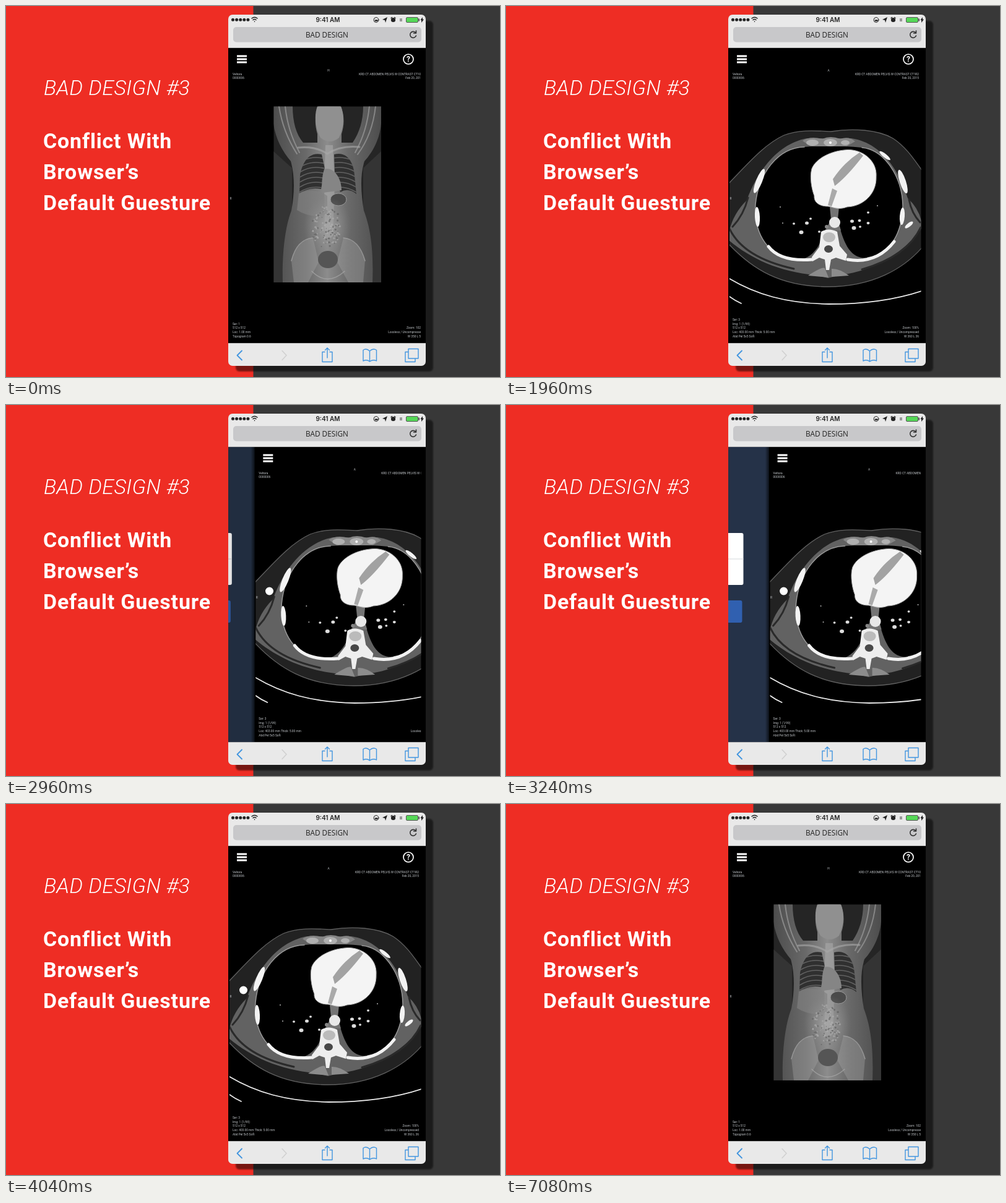
Animation, 798 px wide and 600 px high, one loop 7120 ms. Source, as an HTML page:

```html
<!DOCTYPE html>
<html lang="en">
<head>
<meta charset="utf-8">
<title>Bad design #3</title>
<style>
  html, body { margin: 0; width: 100%; height: 100%; overflow: hidden; background: #383838; }
  svg { display: block; }
  text { font-family: Roboto, "Open Sans", sans-serif; }
  .title { font-size: 34px; fill: #fff; }
  .light { font-weight: 300; font-style: italic; letter-spacing: .4px; }
  .bold { font-weight: 700; letter-spacing: .8px; }
  .tiny text { font-size: 4.8px; fill: #c4c8cc; }
  .line { fill: none; stroke-linecap: round; stroke-linejoin: round; }
</style>
</head>
<body>
<svg width="798" height="600" viewBox="0 0 798 600">
  <defs>
    <clipPath id="screen"><rect x="359" y="68" width="319" height="477"/></clipPath>
    <clipPath id="view"><rect x="359" y="68" width="311.5" height="477"/></clipPath>
    <clipPath id="slice"><rect x="361" y="190" width="310" height="300"/></clipPath>
    <clipPath id="scout"><rect x="432.500" y="162.500" width="173.500" height="284.500"/></clipPath>
    <clipPath id="lungs"><path id="lungShape" d="M510 240C492 236 480 248 475 273L474 303Q490 292 509 296L515 263ZM530 240C549 235 561 249 563 274L566 304Q553 293 540 301L531 270Z"/></clipPath>
    <linearGradient id="flesh" x1="0" x2="1">
      <stop offset="0" stop-color="#4d4d4d"/><stop offset=".3" stop-color="#696969"/>
      <stop offset=".5" stop-color="#8c8c8c"/><stop offset=".7" stop-color="#696969"/>
      <stop offset="1" stop-color="#4d4d4d"/>
    </linearGradient>
    <linearGradient id="edge" x1="0" x2="1">
      <stop offset="0" stop-color="#000" stop-opacity="0"/><stop offset="1" stop-color="#000" stop-opacity=".6"/>
    </linearGradient>
    <radialGradient id="belly">
      <stop offset="0" stop-color="#aaa" stop-opacity=".75"/><stop offset="1" stop-color="#888" stop-opacity="0"/>
    </radialGradient>
    <filter id="soft" x="-10%" y="-10%" width="120%" height="120%"><feGaussianBlur stdDeviation="1.2"/></filter>
  </defs>

  <rect width="798" height="600" fill="#383838"/>
  <rect width="399.500" height="600" fill="#ee2d24"/>
  <text class="title light" x="61" y="144">BAD DESIGN #3</text>
  <g class="title bold">
    <text x="60" y="230">Conflict With</text>
    <text x="60" y="280">Browser’s</text>
    <text x="60" y="330">Default Guesture</text>
  </g>

  <rect x="371" y="24" width="319" height="567" rx="6" fill="#000" opacity=".5" filter="url(#soft)"/>
  <rect x="359" y="14" width="319" height="568" rx="7" fill="#e9e9e9"/>

  <g clip-path="url(#screen)">
    <rect x="359" y="68" width="319" height="477" fill="#253248"/>
    <g id="login">
      <rect x="100" y="207" width="231" height="84" rx="3" fill="#fff"/>
      <path d="M100 249H331" stroke="#d5d8dc"/>
      <rect x="102" y="316" width="227" height="36" rx="3" fill="#3060b0"/>
    </g>
    <rect id="dim" x="359" y="68" width="319" height="477"/>
    <g id="pageBack">
      <rect x="353" y="68" width="6" height="477" fill="url(#edge)"/>
      <rect x="359" y="68" width="330" height="477"/>
    </g>
  </g>

  <g clip-path="url(#view)"><g id="page">
    <g id="scoutView">
      <g clip-path="url(#scout)">
        <rect x="432" y="162" width="175" height="286" fill="#252525"/>
        <path d="M432 235L462 262V447H432ZM606 235L577 262V447H606Z" fill="#343434"/>
        <path d="M432 162H463C463 188 469 208 480 221H503V207C498 190 499 175 505 162H540C547 176 547 192 542 207V221H560C571 205 577 185 577 162H606V190C604 215 592 237 579 251C571 276 574 306 578 331C589 359 594 395 592 447H447C446 403 450 360 461 331C466 304 467 276 460 251C447 236 435 214 432 190Z" fill="url(#flesh)"/>
        <path class="line" d="M441 162Q447 203 470 239M451 162Q455 202 474 237M597 162Q592 208 568 240M587 162Q583 203 564 237" stroke="#a2a2a2" stroke-width="2" opacity=".65"/>
        <path d="M503 162H541C548 179 545 199 538 213Q523 225 508 213C500 199 497 178 503 162Z" fill="#909090"/>
        <path class="line" d="M472 229Q500 226 519 239Q540 225 571 228" stroke="#aaa" stroke-width="3" opacity=".6"/>
        <use href="#lungShape" fill="#303030"/>
        <g id="ribs" class="line" stroke="#8d8d8d" stroke-width="1.500" opacity=".55" clip-path="url(#lungs)"/>
        <path d="M516 225H528L531 285L528 375H515L514 285Z" fill="#a8a8a8" opacity=".6"/>
        <path d="M514 264C529 259 542 278 542 298L512 302Q508 282 514 264Z" fill="#858585"/>
        <ellipse cx="537" cy="313" rx="13" ry="10" fill="#4a4a4a" stroke="#989898"/>
        <path d="M473 303Q496 292 519 307V336Q494 345 470 330Z" fill="#828282" opacity=".65"/>
        <ellipse cx="519" cy="356" rx="39" ry="48" fill="url(#belly)"/>
        <g id="bowel"/>
        <path d="M461 412Q471 378 496 375L505 414L488 447H465ZM580 412Q569 378 545 375L535 414L553 447H577Z" fill="#a2a2a2" opacity=".38"/>
        <path class="line" d="M461 412Q470 377 496 375M580 412Q570 377 545 375M494 429Q519 454 547 429" stroke="#aaa" stroke-width="1.500" opacity=".7"/>
        <ellipse cx="520" cy="410" rx="16" ry="14" fill="#555"/>
      </g>
      <g id="scoutText" class="tiny"></g>
    </g>

    <g id="sliceView">
      <g clip-path="url(#slice)">
        <path d="M350 297C384 263 414 225 449 209C475 199 503 202 525 203C560 197 601 200 625 214C648 229 661 251 680 277V381C644 428 588 454 520 454C447 454 397 429 350 374Z" fill="#222" stroke="#606060" stroke-width="1.300"/>
        <path d="M389 314C405 269 438 223 486 214H558C604 221 633 261 649 311Q669 329 673 357C650 392 600 428 540 435L520 440L500 435C440 430 393 407 359 378Q361 342 389 314Z" fill="#626262"/>
        <path class="line" d="M361 360Q383 407 465 425M670 358Q648 405 575 426M366 357Q384 338 391 310M651 313Q655 335 669 350" stroke="#2a2a2a" stroke-width="3"/>
        <path d="M482 228C439 229 408 271 403 321C400 371 426 406 467 411C493 411 507 391 516 361H540C549 393 562 410 584 407C622 401 640 366 641 323C640 275 610 232 575 229Q525 224 482 228Z"/>
        <path class="line" d="M482 228C439 229 408 271 403 321C400 371 426 406 467 411M575 229C610 232 640 275 641 323C640 366 622 401 584 407" stroke="#999" stroke-width="1.500"/>
        <path d="M479 218Q491 210 511 215Q524 209 540 215Q554 210 564 219L550 227H492Z" fill="#858585"/>
        <g fill="#b0b0b0"><ellipse cx="495" cy="221" rx="10" ry="5"/><ellipse cx="524" cy="221" rx="11" ry="6"/><ellipse cx="548" cy="221" rx="7" ry="4"/></g>
        <circle cx="524" cy="221" r="2" fill="#fff"/>
        <path d="M523 325H538L536 345L541 363H516L525 345Z" fill="#747474"/>
        <path d="M546 233C572 229 600 248 598 276C599 304 577 324 551 325C535 331 526 324 520 324C507 324 497 318 498 307C494 297 490 277 494 263C501 246 525 235 546 233Z" fill="#f4f4f4" stroke="#aaa"/>
        <path d="M571 237Q546 253 528 280L531 291Q550 277 577 242Z" fill="#a2a2a2"/>
        <path d="M527 295L535 299L526 324L520 322Z" fill="#aaa"/>
        <g id="bones" fill="#f3f3f3"></g>
        <path class="line" d="M424 389Q443 414 494 410M552 410Q598 418 627 381" stroke="#f2f2f2" stroke-width="5"/>
        <circle cx="531" cy="350" r="9" fill="#e8e8e8"/><circle cx="518" cy="357" r="3" fill="#858585"/>
        <path d="M509 365Q521 358 535 365L539 388L551 402L549 412L533 407L525 410L522 427H517L515 410L506 407L495 413L494 406L506 390Z" fill="#eee"/>
        <ellipse cx="522" cy="374" rx="10" ry="8" fill="#bbb"/>
        <ellipse cx="521" cy="393" rx="7" ry="6" fill="#484848"/>
        <path d="M488 436Q511 421 515 424L521 439ZM526 425Q538 424 554 436L526 438Z" fill="#8c8c8c"/>
        <g id="vessels" fill="#ddd"></g>
        <path class="line" d="M361 441C403 466 452 481 521 482C581 482 629 475 671 461M361 470Q369 476 380 481" stroke="#ececec" stroke-width="1.800"/>
      </g>
      <g id="sliceText" class="tiny"></g>
    </g>

    <g id="loading">
      <text x="491" y="324" font-size="10" fill="#8e949c">Loading...</text>
      <circle id="spinner" class="line" cx="541" cy="320" r="4.200" stroke="#b0b4ba" stroke-width="1.500" stroke-dasharray="22 4.400"/>
    </g>

    <path d="M373 81H389M373 86H389M373 91H389" stroke="#fff" stroke-width="3"/>
    <circle cx="650" cy="86" r="8" fill="none" stroke="#fff" stroke-width="1.700"/>
    <text x="650" y="90.300" font-size="12" font-weight="700" text-anchor="middle" fill="#fff">?</text>
  </g></g>

  <circle id="dot" cy="301" fill="#fff"/>

  <path d="M359 67.500H678M359 545.500H678" stroke="#b8b8b8"/>
  <g fill="#222">
    <g id="signal"></g>
    <text x="520" y="26" font-size="10" font-weight="600" text-anchor="middle" style="font-family:Inter,sans-serif">9:41 AM</text>
    <path d="M608 22L616 18L613 27L612 23Z"/>
    <circle cx="625.500" cy="22.500" r="3.600"/>
    <path d="M669.500 22.500L673 18V21.500H675L671 27V23Z"/>
    <rect x="666.500" y="20.500" width="1.300" height="4"/>
  </g>
  <g class="line" stroke="#222" stroke-width="1.500">
    <path d="M397 20Q401.500 16.500 406 20M399 22.500Q401.500 20.500 404 22.500M401.500 25V25.300"/>
    <circle cx="598" cy="22.500" r="4" stroke-width="1"/><path d="M596.500 23H600V24H596.500Z"/>
    <path d="M622 19.500L623.500 18.500M629 19.500L627.500 18.500"/>
    <path d="M661 42.500A5 5 0 1 0 662.500 47M662.500 39.500V43.500H658.500"/>
  </g>
  <rect x="636" y="20" width="4" height="5" fill="#999"/>
  <rect x="646.500" y="18.500" width="19" height="8" rx="1.500" fill="#56d858" stroke="#555"/>
  <rect x="367" y="34" width="304" height="24.500" rx="5" fill="#c8c8ca"/>
  <path class="line" d="M661.500 43A5 5 0 1 0 662.500 48M662.500 40V44H658.500" stroke="#333" stroke-width="1.600"/>
  <text x="518.500" y="51" font-size="11.800" text-anchor="middle" fill="#222" style="font-family:'Open Sans',sans-serif">BAD DESIGN</text>
  <g class="line" stroke="#4295df" stroke-width="1.400">
    <path d="M381 557.500L373.500 565L381 572.500" stroke-width="1.800"/>
    <path d="M446 557.500L453 565L446 572.500" stroke="#cfcfcf"/>
    <path d="M515 559.500H511V575.500H527V559.500H523M519 569V553M515.500 556.500L519 553L522.500 556.500"/>
    <path d="M587.500 558Q582 553 577 556.500V574Q583 571 587.500 575Q593 571 598.500 574V556.500Q593 553 587.500 558V575"/>
    <path d="M650 559.500H645V575.500H661V570M650 554.500H666V570H650Z"/>
  </g>
</svg>

<script>
const LOOP = 7120;
const REST = 383.5;
const $ = id => document.getElementById(id);

function add(parent, tag, attrs, label) {
  const el = document.createElementNS("http://www.w3.org/2000/svg", tag);
  for (const key in attrs) el.setAttribute(key, attrs[key]);
  if (label) el.textContent = label;
  parent.append(el);
}

function caption(group, x, y, label, anchor = "start") {
  add(group, "text", { x, y, "text-anchor": anchor }, label);
}

function captions(group, top, study, date, right, left, info) {
  caption(group, 521, 106, top, "middle");
  caption(group, 361.5, 313, "R");
  caption(group, 366, 112, "Veltora");
  caption(group, 366, 118, "0000006");
  caption(group, right, 112, study, "end");
  caption(group, right, 118, date, "end");
  const column = (lines, x, anchor) => lines.forEach((s, i) =>
    caption(group, x, 535.5 - 6.6 * (lines.length - 1 - i), s, anchor));
  column(left, 366);
  column(info, right, "end");
}

captions($("scoutText"), "H", "KRD CT ABDOMEN PELVIS W CONTRAST CT10", "Feb 20, 201", 670,
  ["Ser: 1", "512 x 512", "Loc: 1.00 mm", "Topogram 0.6"],
  ["Zoom: 102", "Lossless / Uncompresse", "W 350 L 5"]);
captions($("sliceText"), "A", "KRD CT ABDOMEN PELVIS W CONTRAST CT1R2", "Feb 20, 2015", 667,
  ["Ser: 3", "Img: 1 (1/99)", "512 x 512", "Loc: 403.00 mm Thick: 5.00 mm", "Abd Pel 5x5 Soft"],
  ["Zoom: 100%", "Lossless / Uncompressed", "W 360 L 36"]);

for (let i = 0; i < 5; i++) add($("signal"), "circle", { cx: 366.5 + i * 6.1, cy: 22.3, r: 2.5 });
for (let y = 240; y < 320; y += 8)
  add($("ribs"), "path", { d: `M470 ${y + 8}Q492 ${y - 9} 519 ${y}Q548 ${y - 9} 570 ${y + 8}` });

[[409, 283, 5, 21, 22], [406, 341, 4, 16, -3], [612, 242, 3, 11, -51], [641, 284, 5, 20, -18],
 [640, 340, 4, 14, 4], [651, 354, 3, 8, 52]].forEach(([cx, cy, rx, ry, a]) =>
  add($("bones"), "ellipse", { cx, cy, rx, ry, transform: `rotate(${a} ${cx} ${cy})` }));

[[443, 325, 1], [447, 351, 1], [465, 352, 2], [486, 351, 3], [492, 344, 2], [477, 366, 3.5],
 [506, 365, 2], [559, 348, 3], [571, 347, 2.5], [562, 359, 3.5], [572, 357, 2], [585, 334, 2],
 [585, 351, 2.5], [600, 323, 1]].forEach(([cx, cy, r]) =>
  add($("vessels"), "ellipse", { cx, cy, rx: r, ry: r * .85 }));

let seed = 17;
const random = () => (seed = seed * 16807 % 2147483647) / 2147483647;
for (let i = 0; i < 130; i++) {
  const angle = random() * 6.283, reach = Math.sqrt(random());
  add($("bowel"), "circle", {
    cx: 517 + Math.cos(angle) * reach * 24, cy: 357 + Math.sin(angle) * reach * 34,
    r: .6 + random() * 1.2, fill: random() < .6 ? "#b4b4b4" : "#555", opacity: .55
  });
}

// Rows of [time, value], eased in and out between neighbours.
const dotX = [[0, 516.5], [900, 516.5], [1360, REST], [2500, REST], [3280, 449], [4000, REST],
  [4100, REST], [4560, 449], [5000, REST], [5080, REST], [5560, 516.5]];
const drag = [[2500, 0], [3280, 66], [4000, 0], [4100, 0], [4560, 66], [5000, 0]];
const dotAlpha = [[800, 0], [900, 1], [1380, 1], [1500, .68], [1700, 0], [2380, 0], [2480, 1],
  [5600, 1], [5720, .68], [5920, 0]];
const dotSize = [[1380, 6.5], [1500, 12.5], [1700, 14.5], [1701, 6.5], [5600, 6.5], [5720, 12.5], [5920, 14.5]];

function at(track, t) {
  const i = track.findIndex(row => row[0] > t);
  if (i === 0) return track[0][1];
  if (i < 0) return track[track.length - 1][1];
  const [t0, a] = track[i - 1], [t1, b] = track[i];
  return a + (b - a) * (1 - Math.cos(Math.PI * (t - t0) / (t1 - t0))) / 2;
}

function viewAt(t) {
  if (t < 1440 || t >= 5760) return "scoutView";
  return t >= 1720 && t < 5520 ? "sliceView" : "loading";
}

function draw(t) {
  const shift = at(drag, t), view = viewAt(t), move = `translate(${shift} 0)`;
  for (const id of ["scoutView", "sliceView", "loading"])
    $(id).style.display = id === view ? "" : "none";
  $("page").setAttribute("transform", move);
  $("pageBack").setAttribute("transform", move);
  $("login").setAttribute("transform", `translate(${shift * .8} 0)`);
  $("dim").setAttribute("opacity", .3 * Math.max(0, 1 - shift / 66));
  $("spinner").setAttribute("transform", `rotate(${t * .36} 541 320)`);
  const dot = $("dot");
  dot.setAttribute("cx", at(dotX, t));
  dot.setAttribute("r", at(dotSize, t));
  dot.setAttribute("opacity", at(dotAlpha, t));
}

const start = performance.now();
function tick() {
  draw((performance.now() - start) % LOOP);
  requestAnimationFrame(tick);
}
draw(0);
requestAnimationFrame(tick);
</script>
</body>
</html>
```
